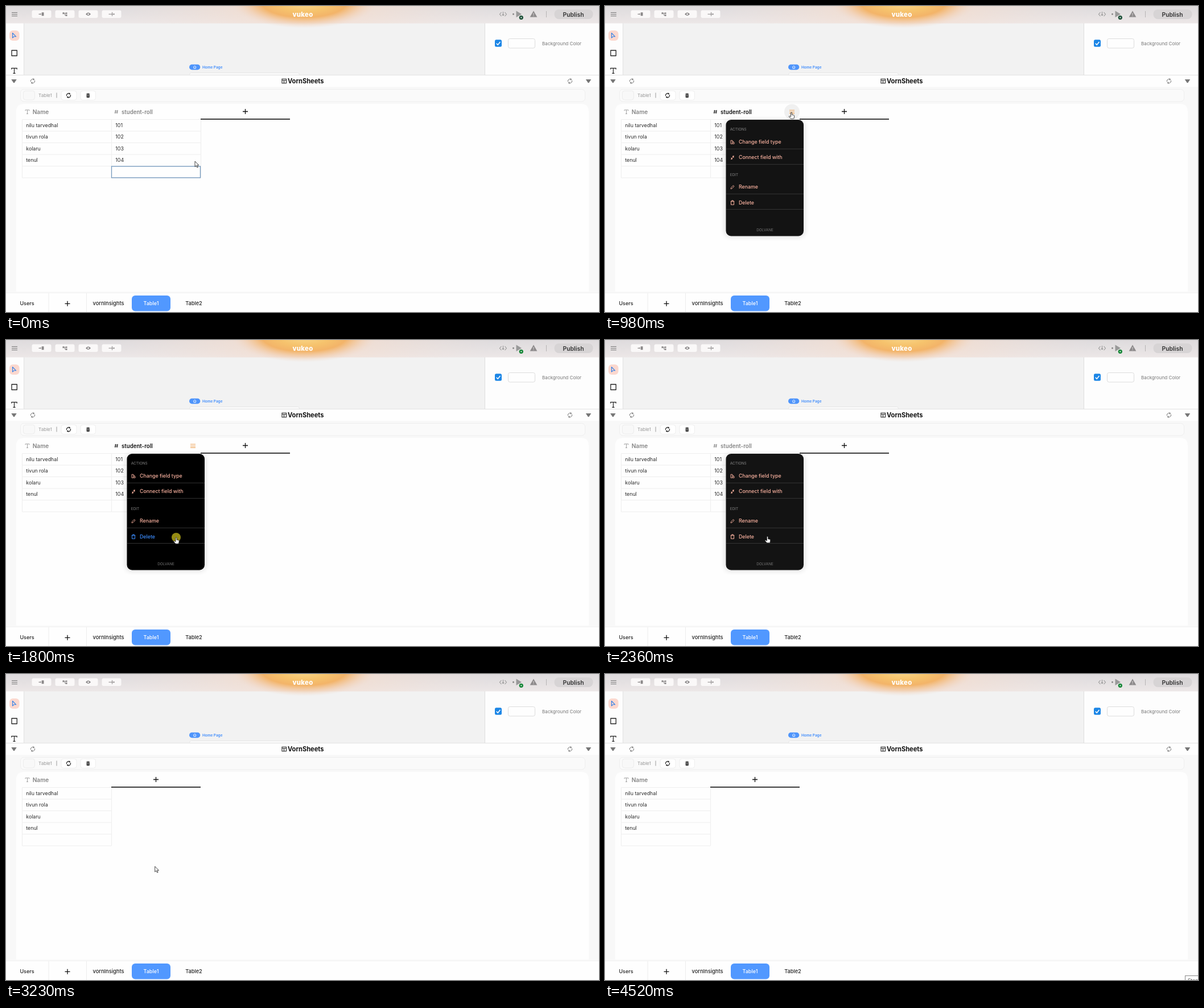
Recreate the animation shown at these times as an HTML page. Size 1042 px wide and 538 px high, loop 4.59 s.

```html
<!DOCTYPE html>
<html lang="en">
<head>
<meta charset="utf-8">
<title>Table editor</title>
<style>
html, body { margin: 0; width: 100%; height: 100%; overflow: hidden; background: #f8f8f8; }
svg { display: block; width: 100vw; height: 100vh; }
text { font-family: Inter, "Open Sans", sans-serif; white-space: pre; }
</style>
</head>
<body>
<svg id="stage" viewBox="0 0 1042 538" xmlns="http://www.w3.org/2000/svg"></svg>
<script>
const LOOP = 4590;

// ---- drawing helpers (text is placed by the middle of its capitals) ----
const label = (x, y, s, size, fill = '#222', weight = 400, extra = '') =>
  `<text x="${x}" y="${y + size * 0.36}" font-size="${size}" fill="${fill}" font-weight="${weight}" ${extra}>${s}</text>`;
const box = (x, y, w, h, r, fill, stroke = 'none') =>
  `<rect x="${x}" y="${y}" width="${w}" height="${h}" rx="${r}" fill="${fill}" stroke="${stroke}"/>`;
const line = (d, stroke, w = 1, extra = '') =>
  `<path d="${d}" fill="none" stroke="${stroke}" stroke-width="${w}" ${extra}/>`;
const shape = (d, fill) => `<path d="${d}" fill="${fill}"/>`;
const at = (x, y, body, extra = '') => `<g transform="translate(${x} ${y})" ${extra}>${body}</g>`;
const MID = 'text-anchor="middle"';
const ROUND = 'stroke-linecap="round" stroke-linejoin="round"';

const refresh = (x, y, c, w) => at(x, y,
  line('M-3.4 1.2A3.6 3.6 0 0 1 1.8-3.1M3.4-1.2A3.6 3.6 0 0 1-1.8 3.1', c, w) +
  shape('M.7-5L3.4-2.9.7-1.2ZM-.7 5L-3.4 2.9-.7 1.2Z', c));
const plus = (x, y) => at(x, y, line('M-4.5 0H4.5M0-4.5V4.5', '#111', 1.3));
const trash = c => line('M-3.3-2.4H3.3M-1.2-2.6V-3.8H1.2V-2.6M-2.5-2.2V3.6H2.5V-2.2', c, 1);

const defs = `<defs>
  <linearGradient id="bar" x2="0" y2="1"><stop stop-color="#dedbdd"/><stop offset="1" stop-color="#ece7e7"/></linearGradient>
  <radialGradient id="glow" gradientUnits="userSpaceOnUse" cx="0" cy="0" r="1" gradientTransform="translate(524 -6) scale(128 45)">
    <stop stop-color="#f9d98d"/><stop offset=".35" stop-color="#f6c36d"/><stop offset=".58" stop-color="#f3b469"/>
    <stop offset=".8" stop-color="#f2cfb0" stop-opacity=".75"/><stop offset="1" stop-color="#f0dcd0" stop-opacity="0"/>
  </radialGradient>
  <radialGradient id="haze" gradientUnits="userSpaceOnUse" cx="0" cy="0" r="1" gradientTransform="translate(524 0) scale(330 80)">
    <stop stop-color="#f8dcc8"/><stop offset="1" stop-color="#f3e4de" stop-opacity="0"/>
  </radialGradient>
  <filter id="soft" x="-20%" y="-20%" width="140%" height="140%"><feGaussianBlur stdDeviation="4"/></filter>
</defs>`;

function topBar() {
  const g = '#8a8788';
  const icons = [
    shape('M-5-.6H-1.8V-2.2L-.6 0-1.8 2.2V.6H-5ZM.2-3H4V3H.2Z', g),
    shape('M-4-3H-1V0H-4ZM1-2.8H4V-.2H1ZM1 .6H4V3.4H1Z', g) + line('M-1-1.5H1M0-1.5V2H1', g, .8),
    shape('M-4.5 0Q0-5.6 4.5 0 0 5.6-4.5 0Z', g) + '<circle r="1.3" fill="#fff"/>',
    line('M-5 0H5M1-3.5V3.5M3.5-1.5L5 0 3.5 1.5', g, 1)
  ];
  return box(0, 0, 1042, 30.5, 0, 'url(#bar)') + box(190, 0, 670, 30.5, 0, 'url(#haze)') +
    box(390, 0, 270, 40, 0, 'url(#glow)') +
    line('M10 11.5H20M10 14.5H20M10 17.5H20', '#777', 1) +
    icons.map((icon, i) => box(45.5 + i * 41, 7.5, 34, 13.5, 3, '#faf8f8') + at(62.5 + i * 41, 14.3, icon)).join('') +
    label(521.5, 15, 'vukeo', 11.4, '#fff', 800, MID + ' letter-spacing=".3"') +
    at(873.5, 14.5, line('M-3-3.5L-6 0-3 3.5M3-3.5L6 0 3 3.5M0-4.5V2M-1.8.3L0 2.2 1.8.3', '#999', 1.1)) +
    '<circle cx="891.5" cy="14.3" r="1.5" fill="#888"/>' +
    shape('M896.5 8.5L906 14.3 896.5 20Z', '#999') +
    '<circle id="badge" cx="905.3" cy="20.3" r="3.6"/>' + at(905.3, 20.3, line('M-1.4 0H1.4M0-1.4V1.4', '#fff', .7)) +
    shape('M927 8.5L933.3 19.5H920.7Z', '#8d8a8b') + line('M927 12.5V15.6M927 16.7V17.9', '#e6e2e3', 1) +
    line('M949.5 9V20', '#b7b4b5') +
    box(963.5, 6, 68, 17, 8, '#d7d4d5') + label(997, 14.8, 'Publish', 10.4, '#333', 600, MID);
}

function workspace() {
  return box(0, 30, 1042, 92, 0, '#f2f2f2') + box(0, 30, 31, 92, 0, '#fdfdfd') + line('M31.5 30V122', '#e2e2e2') +
    box(841, 30, 201, 92, 0, '#fdfdfd') + line('M841.5 30V122', '#dedede') +
    box(6, 43, 17.5, 18, 6, '#fbd8cf') +
    at(11.5, 47.5, line('M0 0V8.5L2.3 6.3H6.2Z', '#2f7fe8', 1.1, 'stroke-linejoin="round"')) +
    line('M10 78H19.3V87.5H10Z', '#222', 1.3, ROUND) +
    line('M9.8 111.5V109.3H19.2V111.5M14.5 109.3V118.3M12.4 118.3H16.6', '#222', 1.2) +
    box(322, 102.8, 19.3, 9.4, 4.7, '#4f95fb') +
    line('M329.2 107.3L331.7 105.2 334.2 107.3M330 107.2V109.7H333.4V107.2', '#fff', .9) +
    label(345, 107.8, 'Home Page', 6.4, '#4f95fb', 700) +
    box(322.5, 117.5, 193, 12, 3, '#fafafa', '#e6e6e6') +
    box(859, 59.3, 12, 12.5, 2.5, '#1c86e6') + line('M861.8 65.8L864.2 68.3 868.5 63', '#fff', 1.5) +
    box(882.5, 57.5, 47, 16.5, 3, '#fefefe', '#dcdcdc') +
    label(942, 65.6, 'Background Color', 8.15, '#777');
}

function sheetFrame() {
  const arrow = x => shape(`M${x - 4.7} 129H${x + 4.7}L${x + 1} 134.7Q${x} 135.6 ${x - 1} 134.7Z`, '#777');
  return box(0, 122, 1042, 416, 0, '#f8f8f8') + box(0, 122, 1042, 20, 0, '#fefefe') + line('M0 121.5H1042', '#e2e2e2') +
    arrow(14) + arrow(1023.5) + refresh(47, 132, '#777', 1) + refresh(991, 132, '#777', 1) +
    line('M485 128.3H492.5V135.7H485ZM485 130.8H492.5M488.5 130.8V135.7', '#222', 1.1) +
    label(495, 132.2, 'VornSheets', 11.1, '#111', 700) +
    box(25.5, 146.5, 992, 21.5, 6, '#fafafa', '#eeeeee') +
    box(30.5, 149, 20, 16, 4, '#f8f8f8', '#ececec') +
    label(57, 157.2, 'Table1', 8.1, '#999') + line('M89 152.5V161.5', '#999') +
    box(97, 149, 27, 16.5, 4, '#fff', '#eeeeee') + refresh(110, 157.2, '#222', 1.2) +
    box(131, 149, 26.5, 16.5, 4, '#fff', '#eeeeee') +
    at(144.2, 157.2, shape('M-3-3H-1.4L-.8-3.8H.8L1.4-3H3V-2H-3ZM-2.5-1.5H2.5V3.8H-2.5Z', '#222') + line('M-1-.2L1 2M1-.2L-1 2', '#fff', .7)) +
    shape('M18 502V186Q18 172 32 172H1010Q1024 172 1024 186V502Z', '#fefefe');
}

function tabs() {
  return box(0, 505, 1042, 33, 0, '#fefefe') + line('M0 504.5H1042', '#f2f2f2') + line('M75 505V538M141.5 505V538', '#ececec') +
    label(37, 523, 'Users', 9, '#222', 500, MID) + plus(108, 523.3) +
    label(180, 523, 'vornInsights', 9.3, '#222', 500, MID) +
    box(221, 509, 68, 27.5, 6, '#5198ff') + label(255, 523, 'Table1', 9, '#fff', 500, MID) +
    label(330, 523, 'Table2', 9.2, '#222', 500, MID);
}

const rowY = i => 199.5 + i * 20.5;
function column(x, cells) {
  let d = `M${x} ${rowY(0)}V${rowY(5)}M${x + 157} ${rowY(0)}V${rowY(5)}`;
  for (let i = 0; i < 6; i++) d += `M${x} ${rowY(i)}H${x + 157}`;
  return line(d, '#eeeeee') + cells.map((s, i) => label(x + 6.8, rowY(i) + 10.2, s, 8.8, '#2a2a2a')).join('');
}

function table() {
  const names = ['nilu tarvedhal', 'tivun rola', 'kolaru', 'tenul'];
  return column(28.5, names) +
    line('M34 184.3V182.8H41V184.3M37.5 182.8V189.5M36 189.5H39', '#999', .9) +
    label(46.7, 186.7, 'Name', 10.1, '#858585', 600) +
    `<g id="rolls">${column(185.5, ['101', '102', '103', '104'])}
      <g id="head">${line('M192.8 182.8L191.8 189.3M196 182.8L195 189.3M191 184.8H197M190.6 187.3H196.6', 'currentColor', .9) +
        label(203, 186.7, 'student-roll', 9.7, 'currentColor', 600)}</g>
      <circle id="halo" cx="328.5" cy="186" r="13.5" fill="#f0f0f0"/>
      <g id="burger">${line('M324 183.3H333M324 186.2H333M324 189.1H333', '#eda154', 1.1)}</g>
      <rect id="focus" x="185.5" width="156" height="20" fill="none" stroke="#7398bd" stroke-width="1.3"/>
    </g>` +
    `<g id="adder">${plus(263.5, 185.5)}${line('M185 198.8H342', '#222', 1.7)}</g>`;
}

// menu rows: centre, bottom rule, name, icon
const ITEMS = [
  [239, 251.3, 'Change field type', line('M-3-3H-.2V3H-3ZM.2-1.8L2-.5.2 2M.2 3H3V.6H2', 'currentColor', .9)],
  [266.3, 278.4, 'Connect field with', shape('M-3 .2H-.2V3H-1.1L-2.4 3.4-3 2.8-1.9 1.4ZM3-.2H.2V-3H1L2.4-3.4 3-2.8 2-1.4Z', 'currentColor')],
  [318.2, 330.4, 'Rename', line('M-3 3L-2.4.7 1.4-3 3-1.4-.8 2.4Z', 'currentColor', .9)],
  [345.5, 357.5, 'Delete', trash('currentColor')]
];
function menu() {
  return `<g id="menu"><rect x="209" y="200" width="143" height="207" rx="12" opacity=".1" filter="url(#soft)"/>
    <rect id="panel" x="212.5" y="200" width="136.5" height="204.5" rx="9"/>` +
    label(219.8, 217, 'ACTIONS', 6.5, '#858585') + label(219.8, 296.2, 'EDIT', 6.4, '#858585') +
    ITEMS.map(([y, rule, name, icon]) =>
      `<g class="item">${at(224, y + .3, icon)}${label(235, y, name, 8.8, 'currentColor', 500)}</g>` +
      line(`M213 ${rule}H349`, '#383838', .9)).join('') +
    label(281, 394, 'DOLVANE', 6.4, '#757575', 400, MID) + '</g>';
}

function overlay() {
  const arrow = 'M0 0V9.6L2.3 7.6 3.9 11 5.4 10.3 3.9 7H6.8Z';
  const hand = 'M-1 1A1 1 0 0 1 1 1V4.3L4.2 5Q5.3 5.3 5.2 6.4L4.7 9.7Q4.5 11.2 3.2 11.2H-.3Q-1 11.2-1.5 10.6L-4.4 7.2Q-3.8 6.2-2.8 6.6L-1 7.6Z';
  const skin = 'fill="#fff" stroke="#333" stroke-width=".9" stroke-linejoin="round"';
  return `<g id="tip">${box(1019.5, 530.5, 40, 20, 0, '#fefefe', '#8a8a8a')}${label(1024, 539, 'Stop', 8.5, '#555')}</g>
    <g id="cursor"><circle id="press" fill="#dccd1c" fill-opacity=".68"/>
    <path id="arrow" d="${arrow}" ${skin}/><path id="hand" d="${hand}" ${skin}/></g>`;
}

document.getElementById('stage').innerHTML =
  defs + workspace() + topBar() + sheetFrame() + table() + tabs() + menu() + overlay();

// ---- motion ----
const $ = id => document.getElementById(id);
const items = [...document.querySelectorAll('.item')];
const show = (id, on) => $(id).setAttribute('visibility', on ? 'visible' : 'hidden');
const ramp = (t, a, b) => Math.min(1, Math.max(0, (t - a) / (b - a)));

// pointer path: time, x, y
const PATH = [
  [0, 332, 273], [70, 332.5, 270], [210, 333, 252], [350, 332, 226], [490, 330, 203], [570, 329, 194],
  [700, 328, 187], [1000, 327.5, 187], [1120, 326, 192], [1260, 321, 221], [1400, 312, 273],
  [1540, 304, 321], [1670, 300, 344], [1740, 299, 347], [2040, 299, 347], [2160, 285.5, 345.5],
  [2360, 285.5, 345.5], [2500, 279, 344], [2700, 264, 339], [2830, 261.5, 338.5], [3230, 261.5, 338.5],
  [3300, 274, 321], [3370, 325, 310], [3440, 425, 323], [3510, 555, 370], [3570, 675, 426],
  [3640, 780, 480], [3710, 860, 517], [3780, 942, 529], [3850, 1010, 552]
];
function pointer(t) {
  const i = PATH.findIndex(p => p[0] > t);
  if (i < 0) return PATH[PATH.length - 1].slice(1);
  const [a, b] = [PATH[i - 1], PATH[i]];
  const k = ramp(t, a[0], b[0]);
  return [a[1] + (b[1] - a[1]) * k, a[2] + (b[2] - a[2]) * k];
}

function draw(t) {
  const [x, y] = pointer(t);
  const removed = t >= 2560;
  const inHead = t >= 510 && t < 2360;
  const inMenu = t >= 1085 && t < 2360;

  // table
  const row = t < 70 ? 4 : Math.floor((pointer(t - 70)[1] - 199.5) / 20.5);
  show('focus', t < 510 && row >= 0);
  $('focus').setAttribute('y', rowY(Math.max(0, row)) + 2 - 1.6);
  $('rolls').setAttribute('display', removed ? 'none' : 'inline');
  $('head').setAttribute('color', inHead ? '#111' : '#858585');
  show('burger', inHead);
  show('halo', t >= 640 && t < 1085);
  $('adder').setAttribute('transform', `translate(${removed ? 0 : 157} 0)`);
  $('badge').setAttribute('fill', t < 1050 ? '#1d5138' : '#138535');

  // menu
  const open = ramp(t, 890, 970) * (1 - ramp(t, 2410, 2530));
  $('menu').setAttribute('opacity', open);
  show('menu', open > 0);
  $('panel').setAttribute('fill', inMenu ? '#000' : '#131313');
  items.forEach((el, i) => {
    const bottom = ITEMS[i][1];
    const over = inMenu && y < bottom && y > bottom - 24;
    el.setAttribute('color', over ? '#3c8dff' : '#fbb3a0');
  });

  // pointer
  const hand = t >= 640 && t < 2500;
  show('cursor', t < 3850);
  $('cursor').setAttribute('transform', `translate(${x} ${y})`);
  $('arrow').setAttribute('display', hand ? 'none' : 'inline');
  $('hand').setAttribute('display', hand ? 'inline' : 'none');
  const pressed = t >= 1725 && t < 1900 ? ramp(t, 1715, 1780) : t >= 850 && t < 950 ? ramp(t, 840, 900) : 0;
  $('press').setAttribute('r', 8 * pressed);

  $('tip').setAttribute('opacity', ramp(t, 4330, 4510));
}

const start = performance.now();
function tick() {
  draw((performance.now() - start) % LOOP);
  requestAnimationFrame(tick);
}
draw(0);
requestAnimationFrame(tick);
</script>
</body>
</html>
```
